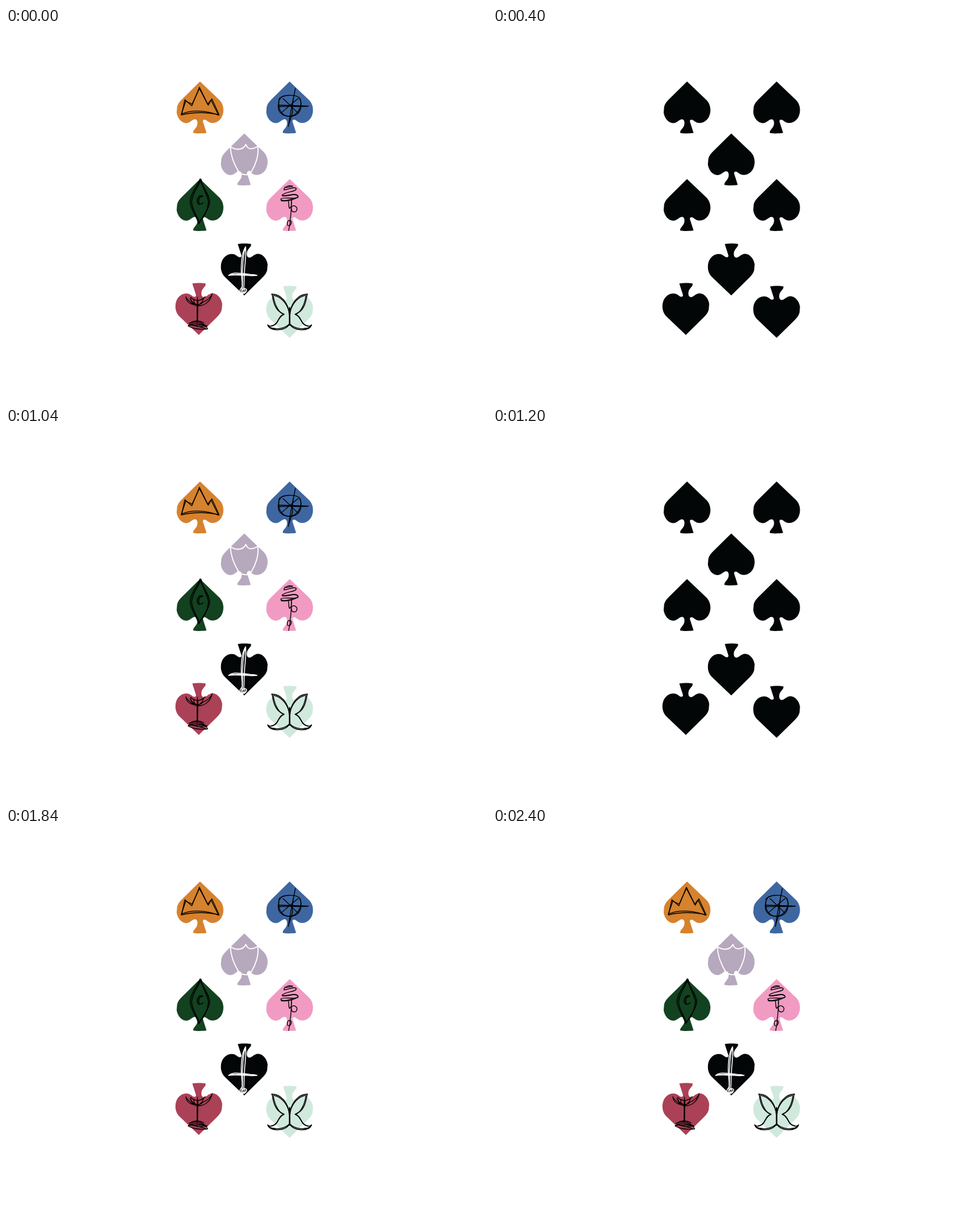
Write an HTML page that moves like this. It is 792 by 612 pixels and loops after 2800 ms.

```html
<!DOCTYPE html>
<html lang="en">
<head>
<meta charset="utf-8">
<title>Eight of spades</title>
<style>
html, body { margin: 0; width: 100%; height: 100%; overflow: hidden; background: #fff; }
svg { display: block; width: 792px; height: 612px; }
.ink path { fill: none; stroke-linecap: round; stroke-linejoin: round; }
</style>
</head>
<body>
<svg id="stage" viewBox="0 0 792 612"></svg>
<script>
const STEP = 400, LOOP = 2800, BLACK = '#020607';
const stage = document.getElementById('stage');

// Spade with its tip at the origin
const SPADE = 'M0 0L32 30.5C36.5 35 38.5 41 38.5 47C38.5 59 31 68 21 68.2C14 68.5 10.5 62.7 7.5 62.7' +
  'C5.2 62.7 4.2 64.4 4.9 66.5L10.7 84.6C5 85.8-6 85.8-11 84.8C-13 80-4.2 77-4.2 68.5' +
  'C-4.2 65-5.5 62.3-8.5 62.3C-13 62.3-16 68.5-23 68.5C-30.5 68.5-37.5 60-38.5 51L-37.7 41.5C-36.5 37-34 33.5-30 29.5Z';

const crown = [
  'M289 143L294.5 118L306 128L318.5 97.5L333 127L339 116.5L351 143C332 138 308 138 289 143',
  'M288.5 142L296 120.5L306.5 125L318.5 99.5L332 125.5L337.5 118.5L349.5 142.5',
  'M290 141C308 134 334 136 350 143.5'
];
const compass = [
  'M449 118C454 109 474 109 482 114C488 121 487 136 479 142C470 148 455 146 450 137C447 131 448 121 452 115',
  'M484 116C489 128 481 144 467 145.5C455 145 448 136 449 121',
  'M476.5 99.5C473 116 468 141 465 162C466 155 470 147 472 138C470 128 474 112 476.5 99.5',
  'M449 127L498 128.5C484 130 468 128 449 129.5',
  'M456 116C464 123 473 133 480 139M481 116C471 124 462 132 454 139'
];
const tulip = [
  'M369 195C378 201 390 202 395 191.5C398 201 406 200 415 194.5',
  'M369.5 196C370 212 377 227 384.5 239',
  'M414.5 195C417 210 410 227 403 238',
  'M381 236.5C388 241 393 242 398 241C397 236 401 234 403.5 238'
];
const eye = [
  'M320 248C314 262 303 274 303 286C304 298 313 309 317.5 322C324 309 335 298 335.5 285C334 273 324 262 319 249',
  'M321.5 249C313 266 307 274 305.5 286C307 301 315 308 318 320C327 311 332 300 333.5 286C331 272 322 262 321.5 249',
  'M324 276.5C318 274.5 314 280 315 286C316 291 321 291 324.5 287.5M323 277C317.5 278 316 284 318 289'
];
const coil = [
  'M471 261C467 257 458 262 457.5 266C463 267 476 259 478 264.5C478 270 457 269 454.5 275.5' +
  'C460 280 478 269 481 277C482 283 455 277 452.5 281.5C454 287 469 282 478 279',
  'M459 262C464 264 468 260 472 260M456 276C464 276 476 271 480 276M453 284C460 286 474 283 481 278',
  'M465 284C466 290 465 294 467 297C470 295 471 291 470 282C470 293 469 309 467.5 318',
  'M470 295C472 290 480 293 479 299C478 305 469 303 470 297',
  'M468 317C464 315 462 321 464 325C469 327 472 318 468 317C468 324 466 328 465.5 333'
];
const dagger = [
  'M394.5 360C389 369 387 386 387.5 402C388 413 390 421 388.5 430M394.5 360C396 374 393 388 392.5 403L391.5 428',
  'M389 404C390 388 390 374 394 362M389.5 406L389 427',
  'M366.5 407C373 401 382 404 391 404L413.5 407C400 409 382 404 366.5 407',
  'M369 406C382 404 398 406 410 406',
  'M388 427C384 432 384 434 386 436C392 439 397 434 396 430C391 426 386 432 388 435C393 438 396 431 391 429C389 432 390 436 393 435'
];
const cup = [
  'M296 442C297 450 302 454 309 455C303 451 299 447 297 444M303 445C306 453 315 458 323 453',
  'M339.5 437C337 448 329 457 317 457C309 458 306 452 304 446M339 439C333 448 327 450 320 453',
  'M304 443C311 450 321 450 328 442M309 447C309 452 311 454 313 455M325 445C324 451 320 455 317 455',
  'M315.5 443C314 456 315 470 314.5 484M316 448L315.5 481',
  'M301 486C312 481 327 484 332 495C320 497 305 494 300 490C307 484 320 486 329 490C321 493 310 491 303 487L330 495',
  'M304 485C310 481 319 481 326 485M300 490C308 487 322 489 331 490'
];
// Left half of the butterfly; the right half is its mirror image
const wing = [
  'M437.5 438C452 437 465 452 466.5 471',
  'M441 440C453 442 462 453 466 466',
  'M438 437.5C440 451 443 466 458 471C447 475 449 487 441 489C437 491 433 491 431 488.5',
  'M440 440C442 454 448 467 456 470M455 472C446 477 450 489 433 491',
  'M431 488.5C434 500 462 499 466.5 487C459 495 443 497 433 492',
  'M466.5 460L466.5 489'
];

const CARDS = [
  { x: 319.5, y: 88, fill: '#d6822e', art: crown, w: 1.3 },
  { x: 467, y: 88, fill: '#3e67a1', art: compass, w: 1.3 },
  { x: 392.3, y: 173.5, fill: '#b6a8bd', art: tulip, ink: '#fff', w: 1.8 },
  { x: 319.5, y: 248.5, fill: '#12421f', art: eye, w: 1.4 },
  { x: 467, y: 248.5, fill: '#f19bc3', art: coil, w: 1.3 },
  { x: 392.3, y: 440, flip: true, fill: BLACK, art: dagger, ink: '#fff', w: 1.5 },
  { x: 317.5, y: 505, flip: true, fill: '#ab4156', art: cup, w: 1.3 },
  { x: 467, y: 509.7, flip: true, fill: '#d0e9dd', art: wing, mirror: true, w: 1.4 }
];

function add(parent, tag, attrs) {
  const el = document.createElementNS(stage.namespaceURI, tag);
  for (const key in attrs) el.setAttribute(key, attrs[key]);
  parent.appendChild(el);
  return el;
}

const pips = CARDS.map(c => add(stage, 'path', {
  d: SPADE, transform: `translate(${c.x} ${c.y})${c.flip ? ' rotate(180)' : ''}`
}));
const ink = add(stage, 'g', { class: 'ink' });
for (const c of CARDS) {
  const style = { stroke: c.ink || '#000', 'stroke-width': c.w };
  for (const d of c.art) {
    add(ink, 'path', { d, ...style });
    if (c.mirror) add(ink, 'path', { d, ...style, transform: `translate(${2 * c.x} 0) scale(-1 1)` });
  }
}

function draw(time) {
  const coloured = Math.floor((time % LOOP) / STEP) % 2 === 0;
  pips.forEach((pip, i) => pip.setAttribute('fill', coloured ? CARDS[i].fill : BLACK));
  ink.setAttribute('visibility', coloured ? 'visible' : 'hidden');
}

const start = performance.now();
function tick() {
  draw(performance.now() - start);
  requestAnimationFrame(tick);
}
tick();
</script>
</body>
</html>
```
